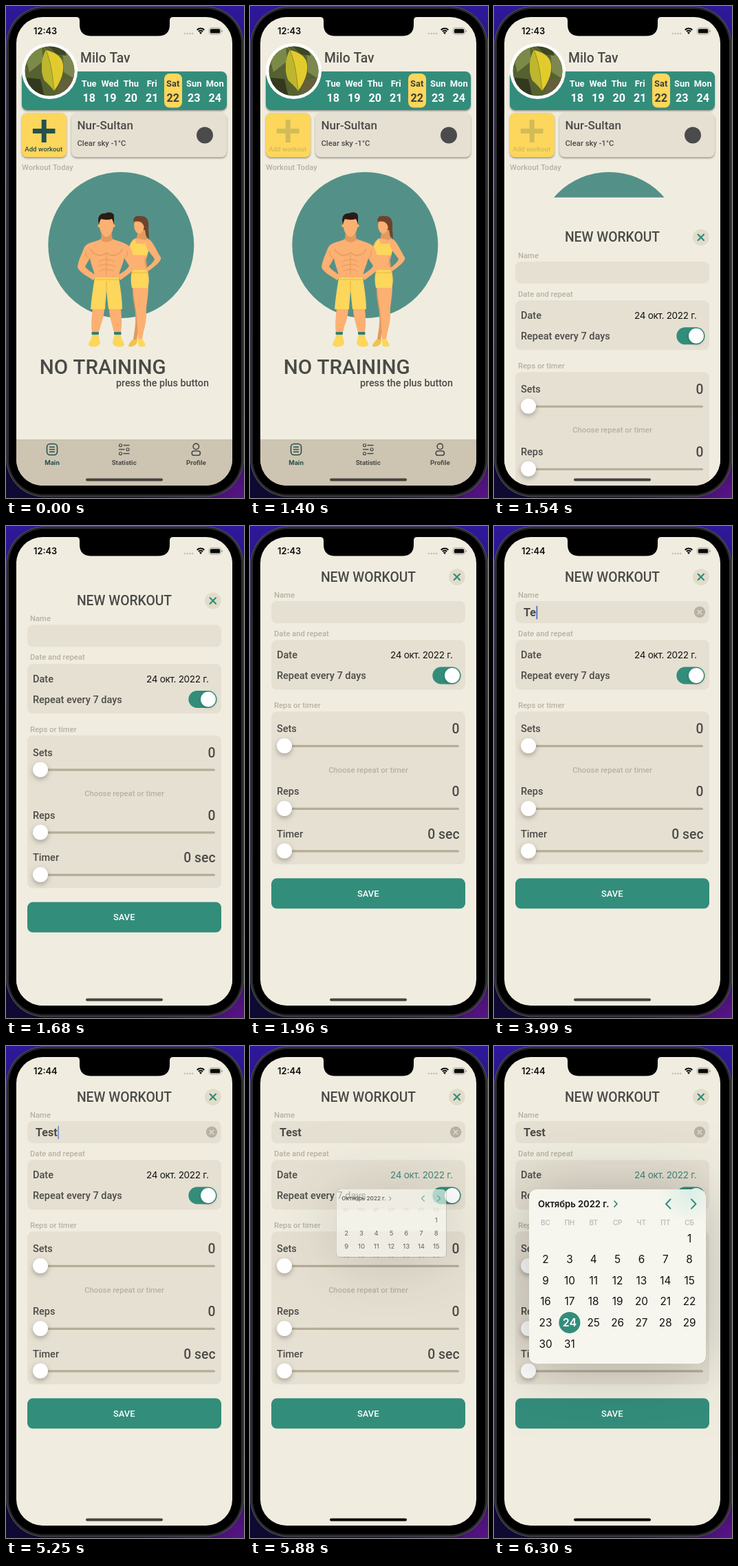
Recreate the animation shown at these times as an HTML page with a canvas. Size 346 by 714 pixels, loop 8000 ms.

```html
<!DOCTYPE html>
<html lang="en">
<head>
<meta charset="utf-8">
<title>Workout planner</title>
<style>
  html, body { margin: 0; width: 100%; height: 100%; overflow: hidden; background: #000; }
  canvas { display: block; width: 346px; height: 714px; }
</style>
</head>
<body>
<canvas id="stage"></canvas>
<script>
const W = 346, H = 714, LOOP = 8000, STEP = 70;
const ROBOTO = 'Roboto, sans-serif', INTER = 'Inter, sans-serif';
const C = {
  paper: '#f0ede0', card: '#e6e0d2', teal: '#338d7b', yellow: '#fdd65c', ink: '#4a4a48',
  mute: '#b6b1a1', deep: '#25504d', bar: '#cdc5b2', track: '#b5ad98',
  skin: '#fcb072', shade: '#e29a5e', hair: '#2c1a15', brown: '#6f432c'
};

const canvas = document.getElementById('stage');
const ctx = canvas.getContext('2d');
const dpr = window.devicePixelRatio || 1;
canvas.width = W * dpr;
canvas.height = H * dpr;

const clamp = v => Math.max(0, Math.min(1, v));
const settle = x => x <= 0 ? 1 : (1 + x) * Math.exp(-x);
const ramp = (t, start) => clamp((t - start + STEP) / (3 * STEP));

function box(x, y, w, h, r, fill) {
  ctx.beginPath();
  ctx.roundRect(x, y, w, h, r);
  ctx.fillStyle = fill;
  ctx.fill();
}
function disc(x, y, r, fill) {
  ctx.beginPath();
  ctx.arc(x, y, r, 0, 7);
  ctx.fillStyle = fill;
  ctx.fill();
}
function shape(d, fill) {
  ctx.fillStyle = fill;
  ctx.fill(new Path2D(d));
}
function line(d, color, width) {
  ctx.strokeStyle = color;
  ctx.lineWidth = width;
  ctx.lineCap = 'round';
  ctx.lineJoin = 'round';
  ctx.stroke(new Path2D(d));
}
function text(s, x, y, size, color = C.ink, weight = 500, align = 'left', font = ROBOTO) {
  ctx.font = `${weight} ${size}px ${font}`;
  ctx.textAlign = align;
  ctx.fillStyle = color;
  ctx.fillText(s, x, y);
}
function withShadow(color, blur, dy, draw) {
  ctx.save();
  ctx.shadowColor = color;
  ctx.shadowBlur = blur * dpr;
  ctx.shadowOffsetY = dy * dpr;
  draw();
  ctx.restore();
}
const raised = (...a) => withShadow('rgba(0,0,0,.4)', 2.5, 1.6, () => box(...a));

function drawPhone() {
  const g = ctx.createLinearGradient(0, 0, 0, H);
  g.addColorStop(0, '#2f189a');
  g.addColorStop(.4, '#150b40');
  g.addColorStop(1, '#0e0a32');
  ctx.fillStyle = g;
  ctx.fillRect(0, 0, W, H);
  const glow = ctx.createRadialGradient(W, H, 0, W, H, 150);
  glow.addColorStop(0, '#5a1488');
  glow.addColorStop(1, 'rgba(90,20,136,0)');
  ctx.fillStyle = glow;
  ctx.fillRect(0, 0, W, H);
  box(.5, .5, 345, 712, 55, '#505154');
  box(1.7, 1.7, 342.6, 709.6, 54, '#1b1b1d');
  box(3, 3, 340, 707, 52, '#38383b');
  box(4, 4, 338, 705, 51, '#000');
}

function drawAvatar() {
  disc(63.5, 94.5, 40.5, '#fff');
  ctx.save();
  ctx.beginPath();
  ctx.arc(63.5, 94.5, 36, 0, 7);
  ctx.clip();
  ctx.fillStyle = '#566132';
  ctx.fillRect(20, 50, 90, 90);
  shape('M26 64 L52 58 L54 80 L34 96 Z', '#7c8a48');
  shape('M82 62 L104 80 L100 106 L84 96 Z', '#7d8850');
  shape('M30 104 L50 106 L56 132 L36 130 Z', '#33391e');
  shape('M80 108 L98 104 L88 130 L72 128 Z', '#645f3c');
  shape('M62 58 L84 60 L88 72 L74 70 Z', '#3c4624');
  shape('M58 64 C50 78 51 98 56 108 C62 114 66 117 70 123 C80 110 87 92 81 78 C76 69 66 66 58 64 Z', '#e2cb2d');
  shape('M58 64 C50 78 51 98 56 108 C62 114 66 117 70 123 C68 104 67 84 58 64 Z', '#bdb72e');
  line('M50 56 L58 64 C66 82 68 104 70 123', '#969026', 1);
  ctx.restore();
}

function drawWoman() {
  shape('M186 314 C183 306 191 303 196 305 C207 304 208 315 207 324 L208 338 L203 333 L196 322 Z', C.brown);
  shape('M192 325 H202 L205 341 H189 Z', C.shade);
  shape('M187 312 C192 307 201 309 201 318 C201 326 196 332 192 330 C187 328 185 320 187 312 Z', C.skin);
  shape('M186 313 C190 305 203 306 203 318 L201 322 C200 314 194 311 186 313 Z', C.brown);
  shape('M184 405 C183 428 189 440 188 450 C189 464 186 474 185 485 H190 C193 468 200 440 198 405 Z', C.shade);
  shape('M185 405 H207 C207 425 203 435 204 448 C204 462 199 472 198 485 H192 C192 470 190 460 190 448 C189 436 185 422 185 405 Z', C.skin);
  shape('M188 337 C181 340 177 350 179 360 C182 366 187 370 186 376 C184 382 182 388 182 396 H207 C208 386 205 378 203 371 C206 362 208 350 206 340 Z', C.skin);
  shape('M203 362 C200 370 202 378 207 390 L204 371 Z', C.shade);
  shape('M187 338 L190 345 H202 L205 337 C209 346 208 356 205 362 L181 361 C177 354 180 346 187 338 Z', C.yellow);
  shape('M184 383 H204 C208 390 209 400 206 409 H183 C181 400 181 390 184 383 Z', C.yellow);
  line('M183 387 H206', '#e6b840', 1);
  shape('M204 337 C213 339 216 350 225 365 C227 370 214 380 205 386 L203 381 C210 376 215 371 216 367 C211 360 206 355 203 347 Z', C.skin);
  shape('M184 484 h7 l-1 6 q-6 6 -12 4 q0 -4 6 -10 z', '#eec44a');
  shape('M191 483 h7 l4 7 q3 6 -9 4 z', C.yellow);
}

function drawMan() {
  shape('M126 438 H143 C143 452 138 460 135 474 H125 C123 462 125 450 126 438 Z', C.skin);
  shape('M150 438 H167 C168 450 169 462 167 474 H157 C154 460 150 452 150 438 Z', C.skin);
  shape('M125 476 H134 L137 488 C137 496 122 496 120 492 C120 487 125 484 125 476 Z', C.yellow);
  shape('M167 476 H158 L155 488 C155 496 170 496 172 492 C172 487 167 484 167 476 Z', C.yellow);
  box(124.5, 473, 10.5, 4, 1, '#2f7f78');
  box(157, 473, 10.5, 4, 1, '#2f7f78');
  shape('M129 394 H164 C166 408 169 424 169 440 H149 L146 412 L144 440 H123 C124 424 127 408 129 394 Z', C.yellow);
  line('M130 397 H163 M146 400 V412', '#e6b840', 1.2);
  shape('M138 338 C130 343 117 342 113 352 C109 362 105 370 104 379 C106 386 118 392 127 398 L131 391 C124 386 117 382 115 378 L122 366 C124 378 129 386 129 394 H164 C164 386 169 378 172 366 L179 377 C177 382 170 386 162 391 L166 398 C175 391 187 384 189 377 C188 368 184 360 181 351 C176 343 163 342 155 338 Z', C.skin);
  shape('M139 326 H153 L155 339 C150 344 142 344 138 339 Z', C.shade);
  disc(135.5, 319, 2.2, C.skin);
  disc(156.5, 319, 2.2, C.skin);
  shape('M136 307 H156 V320 C156 328 150 335 146 335 C142 335 136 328 136 320 Z', C.skin);
  shape('M135 316 C132 306 137 300 144 301 C150 298 158 300 157 306 L157 316 L154 309 C148 311 142 310 138 309 Z', C.hair);
  line('M123 353 C128 363 139 364 146 358 C153 364 164 363 169 353', C.shade, 1.3);
  line('M135 371 C140 367 152 367 157 371 M134 378 C140 374 152 374 158 378 M136 385 C141 381 151 381 156 385 M146 361 V390', C.shade, 1);
  line('M116 356 C115 362 118 365 121 366 M176 356 C177 362 174 365 172 366', C.shade, 1);
}

function drawTabs() {
  ctx.fillStyle = C.bar;
  ctx.fillRect(15, 629, 314, 68);
  ctx.fillStyle = '#c3bba8';
  ctx.fillRect(15, 629, 314, .8);
  ctx.strokeStyle = C.deep;
  ctx.lineWidth = 1.6;
  ctx.beginPath();
  ctx.roundRect(59.5, 635.5, 15, 16, 4.5);
  ctx.stroke();
  line('M63.5 640 h7 M63.5 643.5 h7 M63.5 647 h7', C.deep, 1.3);
  line('M171 637.5 H179 M164.5 643.5 H172 M171 649.5 H179', C.ink, 1.3);
  line('M168.5 637.5 a2 2 0 1 1 -4 0 a2 2 0 1 1 4 0 M179 643.5 a2 2 0 1 1 -4 0 a2 2 0 1 1 4 0 M168.5 649.5 a2 2 0 1 1 -4 0 a2 2 0 1 1 4 0', C.ink, 1.2);
  line('M280.5 639.3 a4.2 4.2 0 1 1 -8.4 0 a4.2 4.2 0 1 1 8.4 0', C.ink, 1.6);
  ctx.beginPath();
  ctx.roundRect(270.2, 645.8, 12.2, 6.2, 3.1);
  ctx.stroke();
  ['Main', 'Statistic', 'Profile'].forEach((s, i) =>
    text(s, 67 + i * 104.7, 665.5, 9.66, i ? C.ink : C.deep, 700, 'center'));
}

function drawHome(pressed) {
  ctx.fillStyle = C.paper;
  ctx.fillRect(15, 16, 314, 681);
  raised(23, 95, 298, 56, 8, C.teal);
  drawAvatar();
  text('Milo Tav', 108, 82, 19.3);
  box(230, 98, 26, 49.5, 8, C.yellow);
  ['Tue', 'Wed', 'Thu', 'Fri', 'Sat', 'Sun', 'Mon'].forEach((day, i) => {
    const x = 120.7 + i * 30.5, color = i === 4 ? '#3d3f36' : '#fff';
    text(day, x, 116.7, 12.9, color, 700, 'center');
    text(18 + i, x, 139.3, 16.1, color, 700, 'center');
  });

  raised(23, 155, 65, 64.5, 8, C.yellow);
  ctx.globalAlpha = pressed ? .2 : 1;
  shape('M51.7 165 h7 v13 h12.8 v7 h-12.8 v13 h-7 v-13 h-12.8 v-7 h12.8 z', C.deep);
  text('Add workout', 54.7, 210.5, 9.66, C.deep, 500, 'center');
  ctx.globalAlpha = 1;

  raised(95, 155, 226, 64.5, 8, C.card);
  text('Nur-Sultan', 103.5, 179, 17);
  text('Clear sky -1°C', 103.5, 203, 11.27);
  disc(289, 187.5, 12, '#4b4b4b');
  text('Workout Today', 23, 238, 11.2, C.mute);

  disc(167.3, 347, 106, '#539188');
  drawWoman();
  drawMan();
  text('NO TRAINING', 48.7, 534, 29.6);
  text('press the plus button', 160, 551.5, 14.3);
  drawTabs();
}

function drawSlider(label, value, y) {
  text(label, 39, y - 20, 14.49);
  text(value, 304.5, y - 18, 19.3, C.ink, 500, 'right');
  box(41, y - 1.2, 263, 3.2, 1.6, C.track);
  withShadow('rgba(0,0,0,.28)', 7, 3, () => disc(50, y, 11, '#fff'));
}

function drawField(t) {
  const n = [3920, 3990, 4410, 4620].filter(at => t >= at).length;
  const typed = 'Test'.slice(0, n);
  box(31, 109, 282, 32, 8, C.card);
  text(typed, 43, 131, 16.1, C.ink, 700);
  const caretX = 43.5 + ctx.measureText(typed).width;
  if (n) {
    disc(299, 125, 8.2, '#b7b1a3');
    line('M296.2 122.2 l5.6 5.6 m0 -5.6 l-5.6 5.6', C.card, 1.4);
  }
  if (t >= 2590 && t < 5670) {
    ctx.globalAlpha = clamp(1 - ramp(t, 3150) + ramp(t, 3500) - ramp(t, 5250) + ramp(t, 5600));
    box(caretX, 115.8, 1.8, 19.5, .9, '#4273c8');
    ctx.globalAlpha = 1;
  }
}

function drawForm(t) {
  const away = settle((t - 1430) / 1000 * 18.9);
  ctx.save();
  if (t < 1960) ctx.translate(0, 680 * away);
  ctx.fillStyle = C.paper;
  ctx.fillRect(15, 16, 314, 681);
  text('NEW WORKOUT', 172, 80.5, 19.3, C.ink, 500, 'center');
  disc(300.8, 74, 12, '#e2dcca');
  line('M296.6 69.8 l8.4 8.4 m0 -8.4 l-8.4 8.4', C.teal, 2.2);

  text('Name', 35, 103.7, 11.27, C.mute);
  drawField(t);

  text('Date and repeat', 35, 159.7, 11.27, C.mute);
  box(31, 165.5, 282, 72, 8, C.card);
  text('Date', 39, 192.3, 14.49);
  ctx.letterSpacing = '-0.3px';
  text('24 окт. 2022 г.', 204, 192, 13.5, t >= 5670 ? '#3f8779' : '#111', 400, 'left', INTER);
  ctx.letterSpacing = '0px';
  text('Repeat every 7 days', 39, 222.3, 14.49);
  box(265.3, 204.5, 41.2, 25, 12.5, C.teal);
  withShadow('rgba(0,0,0,.2)', 4, 1.5, () => disc(294, 217, 11, '#fff'));

  text('Reps or timer', 35, 264.3, 11.27, C.mute);
  box(31, 269.3, 282, 221.7, 8, C.card);
  drawSlider('Sets', '0', 319);
  text('Choose repeat or timer', 172, 357.6, 11.27, C.mute, 500, 'center');
  drawSlider('Reps', '0', 410);
  drawSlider('Timer', '0 sec', 471.5);

  box(31, 511.3, 282, 44, 8, C.teal);
  text('SAVE', 171.7, 537.8, 12.88, '#fff', 500, 'center');
  ctx.restore();
}

// Month sheet: grows from the date label while its lower edge unrolls.
function drawCalendar(t) {
  const s = 1 - (t < 6300 ? settle((t - 5730) / 1000 * 14.1) : 0);
  if (s <= 0) return;
  const ax = 248.5, top = 208, x = ax + (51 - ax) * s, w = 257 * s, h = 253 * s * s;
  const sheet = new Path2D();
  sheet.roundRect(x, top, w, h, 10 * s);

  ctx.save();
  const around = new Path2D(sheet);
  around.rect(0, 0, W, H);
  ctx.clip(around, 'evenodd');
  withShadow(`rgba(0,0,0,${.26 * s})`, 90, 4, () => {
    ctx.fillStyle = '#000';
    ctx.fill(sheet);
  });
  ctx.restore();

  ctx.save();
  ctx.clip(sheet);
  ctx.globalAlpha = s;
  ctx.fillStyle = '#f6f5ee';
  ctx.fillRect(x, top, w, h);
  ctx.translate(ax, top);
  ctx.scale(s, s);
  ctx.translate(-ax, -top);

  const tint = ctx.createRadialGradient(284, 212, 4, 284, 212, 44);
  tint.addColorStop(0, 'rgba(190,232,222,.45)');
  tint.addColorStop(1, 'rgba(190,232,222,0)');
  ctx.fillStyle = tint;
  ctx.fillRect(230, 208, 78, 50);

  text('Октябрь 2022 г.', 64, 234, 13, '#111', 600, 'left', INTER);
  line('M175 225 l4 4.2 l-4 4.2', C.teal, 1.7);
  line('M256.5 222.5 l-6.5 6.7 l6.5 6.7 M287 222.5 l6.5 6.7 l-6.5 6.7', C.teal, 2);

  const colX = i => 75 + i * 34.85;
  ctx.globalAlpha = s * s;
  ['ВС', 'ПН', 'ВТ', 'СР', 'ЧТ', 'ПТ', 'СБ'].forEach((d, i) =>
    text(d, colX(i), 260, 10, '#bfbfba', 600, 'center', INTER));
  ctx.globalAlpha = s;
  for (let d = 1; d <= 31; d++) {
    const cell = d + 5, cx = colX(cell % 7), cy = 279 + Math.floor(cell / 7) * 30.6;
    const picked = d === 24;
    if (picked) disc(cx, cy, 15.5, C.teal);
    text(d, cx, cy + 5.6, picked ? 16 : 15.3, picked ? '#fff' : '#111', picked ? 600 : 400, 'center', INTER);
  }
  ctx.restore();
}

function drawStatus(t) {
  text(t < 2590 ? '12:43' : '12:44', 40, 41, 12.8, '#0a0a0a', 600, 'left', INTER);
  for (let i = 0; i < 4; i++) disc(259.8 + i * 3.8, 40, 1.3, '#bfbdb3');
  ctx.lineCap = 'butt';
  ctx.strokeStyle = '#0a0a0a';
  ctx.lineWidth = 2;
  for (const r of [4.8, 8]) {
    ctx.beginPath();
    ctx.arc(283, 40.6, r, -2.3, -.84);
    ctx.stroke();
  }
  shape('M283 41 L280.9 38.6 Q283 36.8 285.1 38.6 Z', '#0a0a0a');
  ctx.strokeStyle = '#a5a39a';
  ctx.lineWidth = 1;
  ctx.beginPath();
  ctx.roundRect(295.3, 31.7, 17.4, 9.4, 3);
  ctx.stroke();
  box(296.8, 33.2, 14.4, 6.4, 1.7, '#0a0a0a');
  box(313.6, 34.8, 1.3, 3.2, .6, '#a5a39a');
}

function render(t) {
  ctx.setTransform(dpr, 0, 0, dpr, 0, 0);
  drawPhone();
  ctx.save();
  ctx.beginPath();
  ctx.roundRect(15, 16, 314, 680, 38);
  ctx.clip();
  if (t < 1960) drawHome(t >= 1400);
  if (t >= 1470) drawForm(t);
  if (t >= 5740) drawCalendar(t);
  drawStatus(t);
  shape('M102 15 V16 Q107 16 107 21 V27 Q107 43.5 124 43.5 H221 Q238 43.5 238 27 V21 Q238 16 243 16 V15 Z', '#000');
  box(116, 685.4, 112, 4, 2, t < 5600 ? '#46443f' : '#060606');
  ctx.restore();
}

let origin, shown = -1;
function tick(now) {
  origin ??= now;
  const t = Math.floor(((now - origin) % LOOP) / STEP) * STEP;
  if (t !== shown) render(shown = t);
  requestAnimationFrame(tick);
}
requestAnimationFrame(tick);
</script>
</body>
</html>
```
